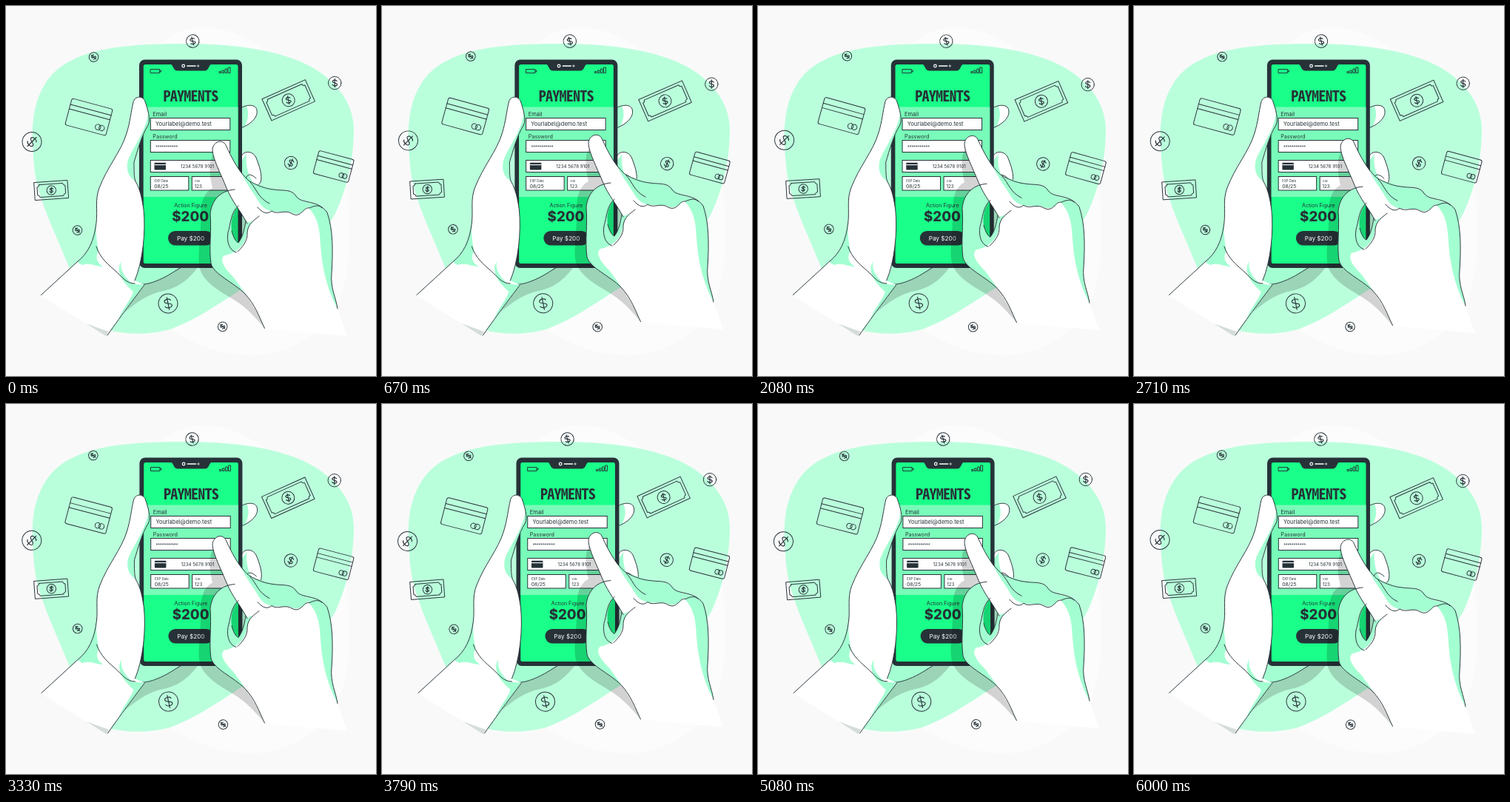
Recreate the animation shown at these times as an HTML page. Size 500 by 500 pixels, loop 6.04 s.

```html
<!DOCTYPE html>
<html lang="en">
<head>
<meta charset="utf-8">
<title>Mobile payment</title>
<style>
  html, body { margin: 0; width: 100%; height: 100%; overflow: hidden; background: #f9f9f9; }
  svg { display: block; width: 100vw; height: 100vh; }
  text { font-family: Inter, "Open Sans", sans-serif; fill: #263238; }
  .line { fill: none; stroke: #263238; stroke-width: .95; stroke-linecap: round; stroke-linejoin: round; }
  .skin { fill: #fff; }
  .tint { fill: #a3ffd1; }
  .ink { fill: #263238; }
  .field { fill: #fff; stroke: #263238; stroke-width: 1; }
  .shade { fill: #000; opacity: .17; }
</style>
</head>
<body>
<svg viewBox="0 0 500 500" xmlns="http://www.w3.org/2000/svg">
  <path fill="#fcfcfc" d="M205 54C222 36 247 28 272 29C306 31 332 44 365 72C420 118 452 180 462 260C468 320 464 378 442 414C420 449 374 473 327 472C270 470 238 445 205 430Z"/>
  <path fill="#baffdc" d="M36 182C34 146 43 110 67 88C98 60 150 51 240 51C300 51 356 57 400 76C442 95 470 128 470 167C470 206 461 245 447 276C425 326 350 362 310 388C285 404 255 425 222 437C196 444 165 445 138 438C112 420 97 380 81 343C68 310 44 262 39 225C37 208 36 195 36 182Z"/>

  <g id="icons" class="line"></g>

  <g id="phone">
    <path class="shade" d="M187 377L237 352H260C250 366 236 380 213 385C192 389 177 400 160 414Z"/>
    <!-- fingers behind the phone -->
    <path class="tint" d="M164 374C174 378 187 377 198 374C216 368 227 359 237 352H164Z"/>
    <path class="line" d="M170 375C180 378 192 376 202 372C218 366 228 358 237 353"/>
    <path class="skin" d="M316 139C324 133 338 132 339 141C341 151 329 161 316 165Z"/>
    <path class="tint" d="M316 139L325 135C329 145 327 154 323 162L316 165Z"/>
    <path class="line" d="M317 138C325 133 338 132 339 141C341 151 329 161 317 165"/>
    <path class="skin" d="M317 205C318 196 333 194 338 205C342 215 347 229 344 238C338 248 326 246 317 241Z"/>
    <path class="tint" d="M317 211L325 200C323 215 328 233 338 244C330 247 322 244 317 241Z"/>
    <path class="line" d="M318 204C319 196 333 194 338 205C342 215 347 229 344 238C338 248 326 246 318 241M324 239C323 228 329 224 338 233"/>

    <!-- device -->
    <rect class="ink" x="180" y="72.5" width="139" height="281.5" rx="7.5"/>
    <rect fill="#1aff89" x="185.8" y="79" width="127.7" height="269" rx="2.5"/>
    <rect fill="#79fbb9" x="185.8" y="136.5" width="127.7" height="121.5"/>
    <path class="ink" d="M222 78.5H278C273 80 275 87.5 268 87.5H232C225 87.5 227 80 222 78.5Z"/>
    <g fill="none" stroke="#fff">
      <circle cx="239.7" cy="81" r="1.8" stroke-width="1.2"/>
      <path d="M245 81H256" stroke-width="1.6" stroke-linecap="round"/>
      <circle cx="259.6" cy="81" r="1.1" stroke-width=".8"/>
    </g>
    <path class="line" d="M195.5 85.5H207.5V90.5H195.5ZM208 87H209.5V89H208"/>
    <path class="line" d="M288.5 88.5h2v2h-2zM292.5 87h2v3.5h-2zM296.5 85h2.2v5.5h-2.2zM300.5 83h2.5v7.5h-2.5z"/>

    <text id="heading" x="249.5" y="129.5" text-anchor="middle" font-weight="700" letter-spacing="-.04em">PAYMENTS</text>

    <rect class="field" x="195.3" y="151.5" width="107.5" height="16"/>
    <rect class="field" x="195.3" y="181.5" width="107.5" height="16"/>
    <rect class="field" x="195.3" y="208.5" width="107.5" height="16"/>
    <rect class="field" x="195.3" y="230.5" width="51.5" height="18.5"/>
    <rect class="field" x="251.3" y="230.5" width="51.5" height="18.5"/>
    <rect class="ink" x="200.5" y="211.7" width="15.5" height="9.8" rx="1"/>
    <path d="M200.5 214.6H216" stroke="#fff" stroke-width="1.1"/>

    <text x="198.3" y="149.3" font-size="7.5">Email</text>
    <text x="202" y="161.6" font-size="7.5">Yourlabel@demo.test</text>
    <text x="198.3" y="179.2" font-size="7.2">Password</text>
    <text x="202.2" y="193.3" font-size="7" style="font-family:'Liberation Sans',Arial,sans-serif">***********</text>
    <text x="236" y="219.2" font-size="6.2">1234 5678 9101</text>
    <text x="200.5" y="238.2" font-size="4.3">EXP Date</text>
    <text x="200.3" y="245.5" font-size="6.8">08/25</text>
    <text x="255" y="238.2" font-size="4.1">CW</text>
    <text x="254.7" y="245.5" font-size="6.2">123</text>
    <text x="249.5" y="271.6" font-size="7.1" text-anchor="middle">Action Figure</text>
    <text x="249.2" y="291.3" font-size="18.6" font-weight="800" text-anchor="middle">$200</text>
    <rect class="ink" x="219" y="304" width="61" height="19.5" rx="9.7"/>
    <text x="249.5" y="316.6" font-size="8.2" text-anchor="middle" style="fill:#fff">Pay $200</text>

    <!-- holding hand -->
    <path class="skin" d="M47 391L96 346C111 334 119 318 122 293C124 275 120 262 126 246C137 217 156 196 163 172C168 156 169 142 172 130C174 121 185 121 188 129C191 138 196 153 192 161C183 175 178 195 173 211C173 222 173 232 175 237C182 249 184 262 186 275C189 305 185 345 174 371L187 377L135 446Z"/>
    <path class="tint" d="M192 144C191 166 171 192 165 208C162 219 164 230 175 237C173 230 172 222 173 211C178 195 183 175 192 161C195 155 193 149 192 144Z"/>
    <path class="tint" d="M123 283C120 305 123 319 125 331C120 340 123 347 131 352C121 352 114 346 103 350L96 346C111 334 119 318 123 283Z"/>
    <path class="tint" d="M156 345C153 355 160 366 170 375L187 377C178 389 165 406 152 423C158 408 170 395 172 386C158 374 147 358 156 345Z"/>
    <path d="M108 429L135 446L139 440L130 437Z" fill="#d5ddd9"/>
    <path class="line" d="M47.5 390.5L96 346C111 334 119 318 122 293C124 275 120 262 126 246C137 217 156 196 163 172C168 156 169 142 172 130C174 121 185 121 188 129C191 138 196 153 192 161C183 175 178 195 173 211C173 222 173 232 175 237C182 249 184 262 186 275C189 305 185 345 174 371"/>
    <path class="line" d="M122 325C127 341 140 351 148 358C157 366 162 375 174 375M187 377C178 389 158 415 137 445"/>
  </g>

  <g id="hand">
    <path class="shade" d="M281 199C272 212 276 232 279 246C267 252 263 266 263 285C264 310 258 337 262 355C269 380 305 392 322 407C334 417 342 427 350 436L345 380L325 320V285Z"/>
    <!-- the gap between the curled fingers and the palm shows the phone -->
    <path class="tint" fill-rule="evenodd" d="M309 247C293 249 278 260 276 281C278 304 274 326 277 348C281 363 307 373 323 389C337 404 342 420 349 435L390 420L434 370C442 340 440 300 434 279C421 265 404 269 397 261C390 249 376 252 358 247L330 238ZM314 270C306 280 303 291 305 304C307 312 310 318 314 320C320 312 322 303 324 291Z"/>
    <path class="skin" d="M326 293C317 277 306 265 298 246C290 226 280 208 279 195C279 183 293 179 297 188C305 205 313 222 328 238L351 268C357 280 374 278 383 278C392 284 402 280 407 271L423 272C430 295 424 321 431 347C434 370 442 385 448 409L461 446L349 436C341 415 328 394 307 366C295 354 288 343 295 337C306 336 320 327 324 314C327 304 326 298 334 290Z"/>
    <path class="tint" d="M318 226C325 241 333 250 340 262C347 275 358 280 371 277C379 277 388 271 400 275C389 263 375 269 365 265C349 258 342 244 329 237Z"/>
    <path class="tint" d="M407 271C421 284 424 300 425 323C427 351 433 382 448 409C446 394 438 381 440 361C442 331 442 300 434 279C426 269 416 271 407 271Z"/>
    <path class="line" d="M326 294C317 277 306 265 298 246C290 226 280 208 279 195C279 183 293 179 297 188C305 205 313 222 328 236C340 243 351 247 362 248C374 250 386 247 392 257C399 268 421 261 434 279C442 302 442 331 440 361C438 381 446 394 448 409"/>
    <path class="line" d="M309 248C292 249 278 260 276 281C278 304 274 326 277 348C281 363 307 373 323 389C337 404 342 420 349.5 435.5"/>
    <path class="line" d="M330 238C339 247 340 259 356 267M342 284C335 290 327 294 326 306C327 318 319 326 313 332M340 272C347 280 353 282 359 277C367 283 377 274 387 281C399 287 402 271 410 273C418 269 424 269 427 273"/>
    <path class="line" d="M314 270C303 280 304 294 300 306C298 320 302 330 311 333M305 304C307 312 310 318 314 320C320 312 322 303 324 291"/>
  </g>
</svg>
<script>
const $ = id => document.getElementById(id);
const LOOP = 6040, CYCLE = 6000, BOB = 1500;

const place = (x, y, angle, body) =>
  `<g transform="translate(${x} ${y}) rotate(${angle})">${body}</g>`;

function coin(x, y, r, angle) {
  const dollar = `<path stroke-width="1.15" vector-effect="non-scaling-stroke" transform="scale(${r / 10})"
    d="M3.3-3C2.4-5-3.2-5.2-3.4-2.3C-3.4.7 3.6-.7 3.6 2.4C3.4 5.2-2.6 5-3.6 2.7M0-6.5V6.5"/>`;
  return place(x, y, angle, `<circle r="${r}"/>${dollar}`);
}

function bill(x, y, w, h, angle, r) {
  const a = w / 2 - 3.5, b = h / 2 - 3.5, n = 3;
  const inner = `M${n - a} ${-b}H${a - n}q0 ${n} ${n} ${n}V${b - n}q${-n} 0 ${-n} ${n}H${n - a}q0 ${-n} ${-n} ${-n}V${n - b}q${n} 0 ${n} ${-n}Z`;
  return place(x, y, angle,
    `<rect x="${-w / 2}" y="${-h / 2}" width="${w}" height="${h}"/><path d="${inner}"/>${coin(0, 0, r, 12)}`);
}

function card(x, y, w, h, angle) {
  const r = h * .1, cx = w * .27, cy = h * .27;
  return place(x, y, angle,
    `<rect x="${-w / 2}" y="${-h / 2}" width="${w}" height="${h}" rx="2.5"/>
     <path d="M${-w / 2} ${-h * .27}H${w / 2}M${-w / 2} ${-h * .1}H${w / 2}"/>
     <circle cx="${cx}" cy="${cy}" r="${r}"/><circle cx="${cx + r * 1.4}" cy="${cy}" r="${r}"/>`);
}

$('icons').innerHTML = [
  coin(252.3, 47.5, 8.7, -15), coin(118.5, 69, 6.3, -50), coin(444.3, 104, 8.7, 0),
  coin(35, 183.5, 13, 45), coin(385, 212, 8.7, 25), coin(96.5, 303, 6.3, -40),
  coin(219, 402, 13, -12), coin(292.7, 433.3, 6.3, -50),
  bill(381.7, 127.3, 64, 32, -24, 8.5), bill(61.3, 249, 45, 24, -4, 6.2),
  card(112, 150, 57, 37, 15), card(442.7, 217, 49, 32, 15),
].join('');

// Pick the narrowest installed face for the condensed heading.
function setHeading() {
  const text = $('heading');
  const faces = ['Open Sans Condensed', 'Open Sans', 'Noto Sans', 'Roboto Condensed', 'Noto Sans Mono CJK JP'];
  const widthIn = face => {
    text.style.fontFamily = `"${face}", sans-serif`;
    return text.getComputedTextLength();
  };
  text.style.fontStretch = 'extra-condensed';
  text.style.fontSize = '10px';
  const best = faces.map(face => [widthIn(face), face]).sort((a, b) => a[0] - b[0])[0];
  const size = Math.min(24, 740 / best[0]);
  text.style.fontFamily = `"${best[1]}", sans-serif`;
  text.style.fontSize = size + 'px';
  text.setAttribute('y', 121.5 + size * .357);
}
setHeading();

// Linear interpolation through [position, value] stops.
function track(stops, p) {
  const i = Math.max(1, stops.findIndex(s => s[0] >= p));
  const [p0, v0] = stops[i - 1], [p1, v1] = stops[i];
  return v0 + (v1 - v0) * (p - p0) / (p1 - p0);
}

const SWAY = [[0, 0], [.25, 1], [.75, -1], [1, 0]];
const SHAKE = [0, -1, 2, -4, 4, -4, 4, -4, 2, -1, 0].map((v, i) => [i / 10, v]);
const FLOAT = [[0, 0], [.5, -10], [1, 0]];

function render(ms) {
  const p = ms % CYCLE / CYCLE;
  $('icons').setAttribute('transform', `rotate(${track(SWAY, p)} 245.5 239)`);
  $('phone').setAttribute('transform', `translate(${track(SHAKE, p)} 0)`);
  $('hand').setAttribute('transform', `translate(0 ${track(FLOAT, ms % BOB / BOB)})`);
}

const start = performance.now();
function tick() {
  render((performance.now() - start) % LOOP);
  requestAnimationFrame(tick);
}
render(0);
requestAnimationFrame(tick);
</script>
</body>
</html>
```
